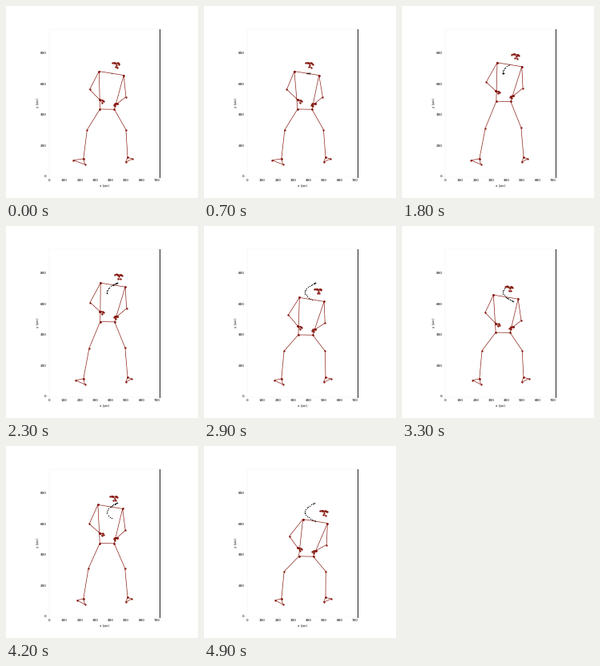
These frames come from a looping animation (240 px wide and 240 px high, 5 s). A matplotlib script:

```python
import numpy as np
import matplotlib.pyplot as plt
from matplotlib.animation import FuncAnimation

FRAMES, STEP_MS = 50, 100
SCALE, LEFT, BOTTOM = 0.1925, 53.7, 213.6
BODY_COLOR, TRAIL_COLOR, FAINT = "#86180f", "#18201f", "#e9e9e9"
NECK_HIGH = np.array([132, 72.5])

FACE_X = np.array([-5, -2.9, -2, -1.1, 0.5, 1.5, 2.3, 3.2, 3.8])
HAND = np.array([(3.2, 0.4), (4.3, 1.6), (2.6, 3.2)])


def neck(t):
    """Ready stance, then a C-shaped swing: x turns twice for each turn of y."""
    phase = np.radians(np.interp(t, [1.4, 2.3, 2.9, 3.7, 4.2, 4.9],
                                 [-278, -140, -35, 150, 235, 360]))
    ease = np.clip(t / 1.2, 0, 1)
    settle = 1 - ease * ease * (3 - 2 * ease)
    return np.array([132.5 + 6.5 * np.cos(2 * phase) + 5.5 * settle,
                     82.5 + 11.5 * np.cos(phase)])


def face(center, tilt):
    eyes_y = np.where(np.abs(FACE_X) > 3.5, 0.3, -0.6)
    eyes_y[len(FACE_X) // 2] = 2
    mouth = np.array([(-0.6, 4.6), (1.8, 4.6)])
    shear = np.array([[1, tilt], [0, 1]])
    return [np.c_[FACE_X, eyes_y] @ shear + center, mouth @ shear + center]


def hand(wrist, direction):
    thumb, index, pinky = wrist + HAND * (direction, 1)
    return [wrist, thumb, wrist, index, pinky, wrist]


def leg(hip, depth, direction, t):
    if direction > 0:
        knee = (hip[0] - 13.5 - 4.5 * depth, 152.5 + 4 * depth)
        ankle, heel = (96.8, 191), (98.5, 198)
        toe = (84 + 1.3 * min(t, 3.7), 192.8)
    else:
        knee = (hip[0] + 13 + 2.5 * depth, 152 + 4.5 * depth)
        ankle, heel = (152, 189.3), (149.5, 195.2)
        toe = (157 + 2 * depth, 191)
    return [hip, knee, ankle, heel, toe, ankle]


def skeleton(t):
    """Polylines of the whole body, separated by gaps; joints follow the neck."""
    top = neck(t)
    move = top - NECK_HIGH
    depth = move[1] / 20

    def follow(x, y, gain_x, gain_y):
        return np.array([x, y]) + move * (gain_x, gain_y)

    half = np.array([15.4, 2.5])
    shoulders = [top - half, top + half]
    elbows = [follow(104.6, 94.5, 0.3, 0.85), follow(150, 102, 0.45, 1)]
    wrists = [follow(117.3, 105.5, 0, 1.02), follow(139, 111.5, 0.1, 0.9)]
    hips = [follow(117.5, 118.5, 0.15, 0.9), follow(135.5, 118.8, 0.15, 0.9)]
    head = top + (6 + 0.7 * move[0], -12.3)

    parts = face(head, 0.13)
    parts.append([*shoulders, *hips[::-1], shoulders[0]])
    for shoulder, elbow, wrist, hip, direction in zip(shoulders, elbows, wrists,
                                                      hips, (1, -1)):
        parts += [[shoulder, elbow, wrist], hand(wrist, direction),
                  leg(hip, depth, direction, t)]
    gap = [(np.nan, np.nan)]
    return np.concatenate([p for part in parts for p in (part, gap)])


def to_data(points):
    x, y = np.asarray(points).T
    return (x - LEFT) / SCALE, (BOTTOM - y) / SCALE


plt.rcParams.update({"font.family": "DejaVu Sans", "text.hinting": "none"})
fig, ax = plt.subplots(figsize=(8, 8), dpi=30)
ax.set(xlim=(0, 720), ylim=(0, 960), aspect="equal", xlabel="x (px)", ylabel="y (px)")
ax.set_xticks(range(0, 701, 100))
ax.set_yticks(range(0, 801, 200))
ax.tick_params(color=FAINT)
ax.spines[["left", "top", "bottom"]].set_color(FAINT)
ax.spines["right"].set(color="#222222", linewidth=2.4)
trail_line, = ax.plot([], [], "o", color=TRAIL_COLOR, ms=3.3, mew=0)
body_line, = ax.plot([], [], "o-", color=BODY_COLOR, lw=1.6, ms=5.6, mew=0)


def draw(frame):
    t = frame * STEP_MS / 1000
    body_line.set_data(*to_data(skeleton(t)))
    times = np.arange(max(0, t - 0.95), t + 0.001, 0.05)
    trail_line.set_data(*to_data([neck(s) for s in times]))
    return trail_line, body_line


anim = FuncAnimation(fig, draw, frames=FRAMES, interval=STEP_MS, repeat=True)
plt.show()
```
